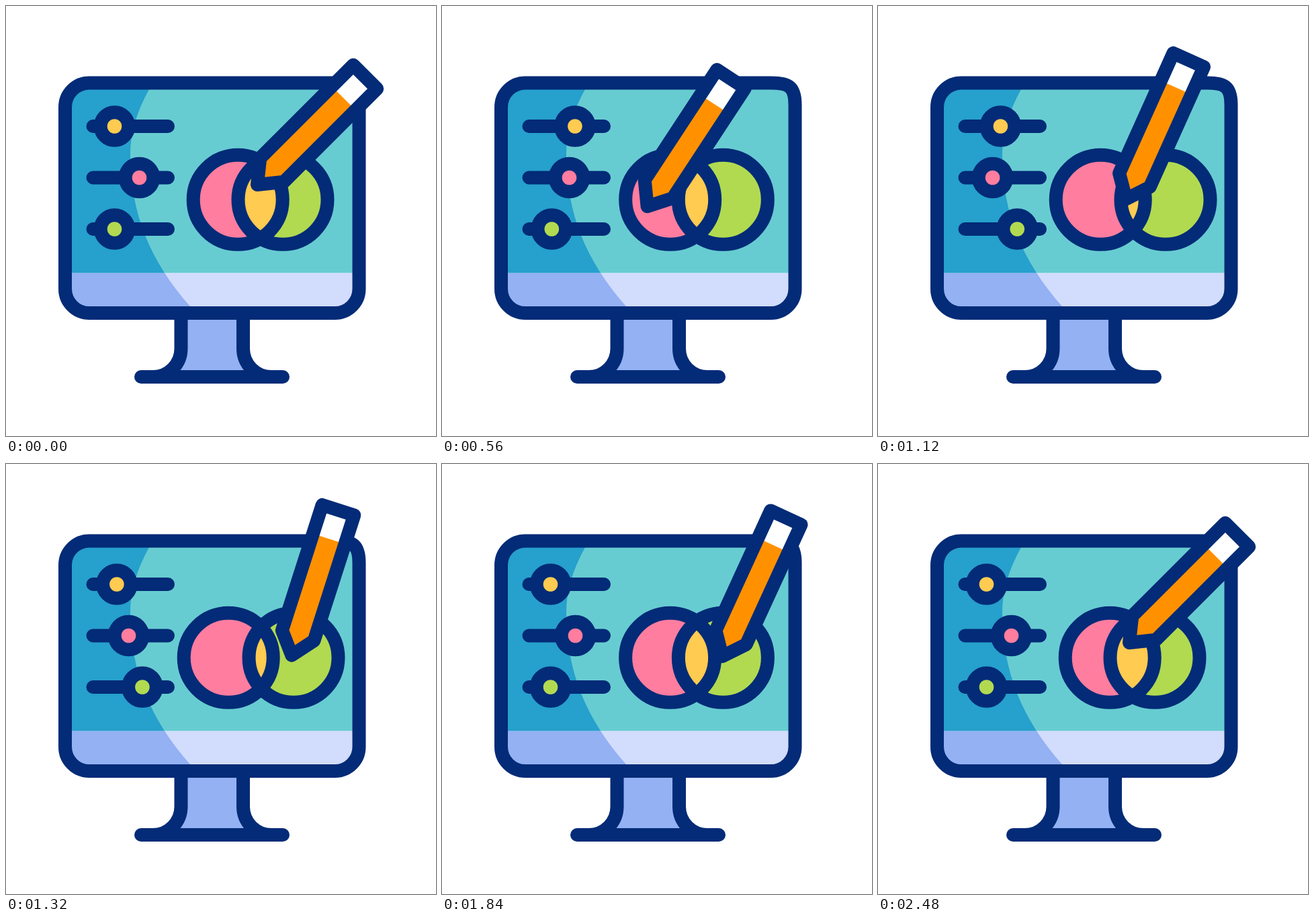
An HTML page with a canvas that plays this animation: 640 px wide and 640 px high, repeating every 3000 ms.

```html
<!DOCTYPE html>
<html lang="en">
<head>
<meta charset="utf-8">
<title>Design monitor</title>
<style>
  html, body { margin: 0; width: 100%; height: 100%; overflow: hidden; background: #fff; }
  canvas { display: block; }
</style>
</head>
<body>
<canvas id="stage" width="640" height="640"></canvas>
<script>
const ctx = document.getElementById('stage').getContext('2d');
const LOOP = 3000, STEP = 40;
const NAVY = '#032b77', TEAL = '#67ccd1', BLUE = '#26a0cc', PALE = '#d2dcfc', LILAC = '#93b1f3';
const PINK = '#ff7d9f', GREEN = '#b1da51', YELLOW = '#ffcb50', ORANGE = '#ff9100';

const screen = new Path2D('M124 114.5H490C516 114.5 525.5 120 525.5 147V421A36 36 0 0 1 489.5 457H124A36 36 0 0 1 88 421V150.5A36 36 0 0 1 124 114.5Z');
const shade = new Path2D('M213 124C194 158 185 190 185 220C185 310 215 380 274 447L282 457H80V104H224Z');
const neck = new Path2D('M260.5 457V510A42 42 0 0 1 218.5 552H395A42 42 0 0 1 353 510V457');
const base = new Path2D('M201 552H412');
const body = new Path2D('M0 0L31 -25H227V25H31Z');

const sliders = [
  { y: 179, rest: 161.5, move: 46.5, color: YELLOW, times: [130, 745, 765, 1430] },
  { y: 255.5, rest: 198.5, move: -30, color: PINK, times: [306, 1004, 1020, 1648] },
  { y: 332, rest: 161.5, move: 46, color: GREEN, times: [480, 1150, 1200, 1815] }
];

// Pencil tip and angle; "via" bends the path from the previous pose.
const poses = [
  { t: 80, x: 374, y: 266, angle: 45 },
  { t: 640, x: 300, y: 297.5, angle: 57.4, via: [351, 306] },
  { t: 860, x: 303.3, y: 290.5, angle: 58.2 },
  { t: 1360, x: 427.5, y: 284.6, angle: 72.5 },
  { t: 1600, x: 427.5, y: 284.6, angle: 72.5 },
  { t: 2320, x: 374, y: 266, angle: 45, via: [410, 292] }
];

function ease(t, from, to) {
  const p = Math.min(1, Math.max(0, (t - from) / (to - from)));
  return p * p * (3 - 2 * p);
}

const outAndBack = (t, [a, b, c, d]) => ease(t, a, b) - ease(t, c, d);
const mix = (a, b, p) => a + (b - a) * p;

function pencilPose(t) {
  const i = Math.max(1, poses.findIndex(pose => pose.t > t));
  const [a, b] = t >= poses.at(-1).t ? poses.slice(-2) : [poses[i - 1], poses[i]];
  const p = ease(t, a.t, b.t);
  const [cx, cy] = b.via || [(a.x + b.x) / 2, (a.y + b.y) / 2];
  const curve = (from, via, to) => mix(mix(from, via, p), mix(via, to, p), p);
  return { x: curve(a.x, cx, b.x), y: curve(a.y, cy, b.y), angle: mix(a.angle, b.angle, p) };
}

function disc(x, y, r) {
  const path = new Path2D();
  path.arc(x, y, r, 0, Math.PI * 2);
  return path;
}

function fill(path, color) {
  ctx.fillStyle = color;
  ctx.fill(path);
}

function drawMonitor() {
  fill(neck, LILAC);
  ctx.stroke(neck);
  ctx.stroke(base);

  ctx.save();
  ctx.clip(screen);
  const halves = (top, bottom) => {
    ctx.fillStyle = top;
    ctx.fillRect(80, 104, 456, 293.5);
    ctx.fillStyle = bottom;
    ctx.fillRect(80, 397.5, 456, 70);
  };
  halves(TEAL, PALE);
  ctx.clip(shade);
  halves(BLUE, LILAC);
  ctx.restore();
  ctx.stroke(screen);
}

function drawSlider(t, { y, rest, move, color, times }) {
  ctx.stroke(new Path2D(`M129.5 ${y}H241`));
  const knob = disc(rest + move * outAndBack(t, times), y, 20.8);
  fill(knob, color);
  ctx.stroke(knob);
}

function drawCircles(t) {
  const spread = outAndBack(t, [200, 1040, 1340, 2220]);
  const left = disc(345.2 - 14 * spread, 288.3, 66.5);
  const right = disc(412 + 16 * spread, 288.3, 66.5);
  fill(left, PINK);
  fill(right, GREEN);
  ctx.save();
  ctx.clip(left);
  fill(right, YELLOW);
  ctx.restore();
  ctx.stroke(left);
  ctx.stroke(right);
}

function drawPencil(t) {
  const { x, y, angle } = pencilPose(t);
  ctx.save();
  ctx.translate(x, y);
  ctx.rotate(-angle * Math.PI / 180);
  fill(body, ORANGE);
  ctx.fillStyle = '#fff';
  ctx.fillRect(182, -25, 45, 50);
  ctx.stroke(body);
  ctx.restore();
}

function draw(now) {
  const t = Math.floor(now % LOOP / STEP) * STEP;
  ctx.fillStyle = '#fff';
  ctx.fillRect(0, 0, 640, 640);
  ctx.strokeStyle = NAVY;
  ctx.lineWidth = 20;
  ctx.lineCap = ctx.lineJoin = 'round';
  drawMonitor();
  sliders.forEach(slider => drawSlider(t, slider));
  drawCircles(t);
  drawPencil(t);
  requestAnimationFrame(draw);
}

draw(0);
</script>
</body>
</html>
```
